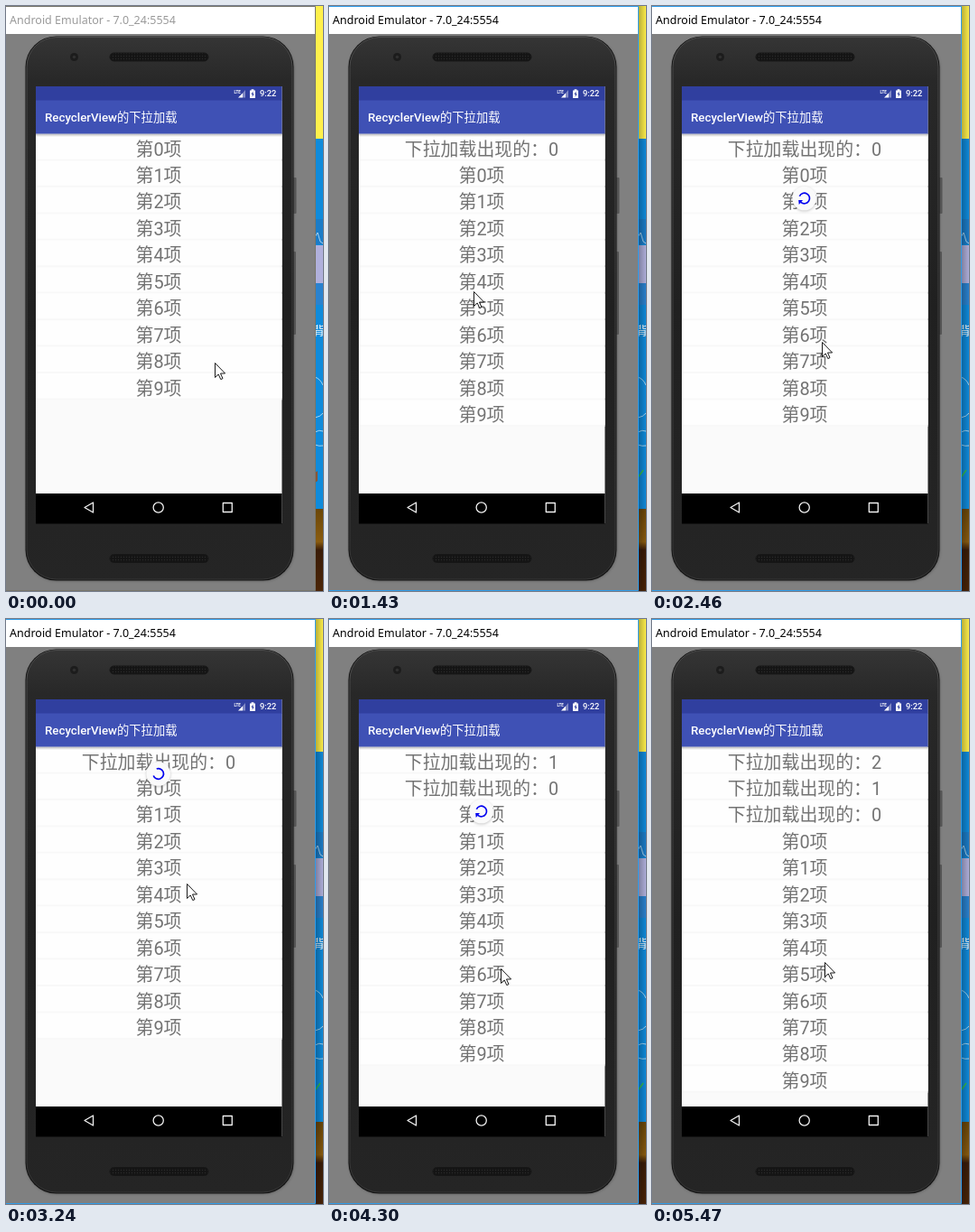
An HTML page for the animation above (6.08 s loop, 351 by 648 pixels).

```html
<!DOCTYPE html>
<html lang="zh-CN">
<head>
<meta charset="utf-8">
<title>Pull to load</title>
<style>
html, body { margin: 0; width: 100%; height: 100%; overflow: hidden; background: #808080; }
svg { display: block; width: 351px; height: 648px; }
text { font-family: Roboto, "Noto Sans CJK SC", sans-serif; }
#rows text { font-size: 19.9px; fill: #737373; text-anchor: middle; }
.caption { font: 12.5px "Noto Sans", "Open Sans", sans-serif; }
.active .idle, svg:not(.active) .focus { display: none; }
</style>
</head>
<body>
<svg id="stage" viewBox="0 0 351 648">
  <defs>
    <linearGradient id="body" x2="0" y2="1">
      <stop offset="0" stop-color="#353535"/><stop offset=".08" stop-color="#282828"/>
      <stop offset=".5" stop-color="#202020"/><stop offset="1" stop-color="#252525"/>
    </linearGradient>
    <linearGradient id="edge" x2="0" y2="1">
      <stop offset="0" stop-color="#4c4c4c"/><stop offset="1" stop-color="#363636"/>
    </linearGradient>
    <linearGradient id="drop" x2="0" y2="1">
      <stop offset="0" stop-opacity=".32"/><stop offset="1" stop-opacity="0"/>
    </linearGradient>
    <linearGradient id="dim">
      <stop offset="0" stop-opacity=".3"/><stop offset="1" stop-opacity=".03"/>
    </linearGradient>
    <linearGradient id="soil" x2="0" y2="1">
      <stop offset="0" stop-color="#6b4708"/><stop offset=".4" stop-color="#8a5c10"/>
      <stop offset=".5" stop-color="#3a1c08"/><stop offset="1" stop-color="#4b2508"/>
    </linearGradient>
    <pattern id="mesh" width="3" height="3" patternUnits="userSpaceOnUse">
      <rect width="3" height="3" fill="#141414"/><circle cx="1.5" cy="1.5" r=".7" fill="#2a2a2a"/>
    </pattern>
    <filter id="soft" x="-50%" y="-50%" width="200%" height="200%"><feGaussianBlur stdDeviation="1.6"/></filter>
    <clipPath id="view"><rect x="33" y="141.5" width="272.5" height="399"/></clipPath>
  </defs>

  <!-- desktop strip -->
  <rect x="342" width="9" height="148" fill="#fff04b"/>
  <rect x="342" y="147" width="9" height="411" fill="#0f8bdc"/>
  <rect x="342" y="236" width="9" height="28" fill="#1b7cc8"/>
  <rect x="342" y="265" width="9" height="42" fill="#b0b0dc"/>
  <rect x="342" y="307" width="9" height="24" fill="#2a82cf"/>
  <rect x="342" y="557" width="9" height="91" fill="url(#soil)"/>
  <path d="M342 256l3-5 3 10 3 2M342 411q6 2 9 9M342 456q6-1 9-5M342 472q5-3 9-1M342 486q5 2 9 1"
    fill="none" stroke="#b8def5" stroke-width=".9"/>
  <text x="340" y="364" font-size="13" fill="#fff">背</text>
  <path class="idle" d="M342 517l3-2v11l-3 2z" fill="#8a5636"/>
  <path class="focus" d="M341 518l2 3 5-7" fill="none" stroke="#35c24a" stroke-width="1.5"/>
  <rect class="focus" x="342" width="9" height="648" fill="url(#dim)"/>

  <!-- window -->
  <rect width="342" height="648" fill="#808080"/>
  <rect width="342" height="31" fill="#fff"/>
  <g class="idle">
    <path d="M0 .5H342.500V647.500H0" fill="none" stroke="#77756a"/>
    <text class="caption" x="4" y="20" fill="#9a9a9a">Android Emulator - 7.0_24:5554</text>
  </g>
  <g class="focus">
    <path d="M0 .5H342.500V647.500H0" fill="none" stroke="#2f9be8"/>
    <text class="caption" x="4" y="20">Android Emulator - 7.0_24:5554</text>
  </g>

  <!-- phone -->
  <rect x="22" y="35" width="297" height="602" rx="34" opacity=".25" filter="url(#soft)"/>
  <g fill="#555">
    <rect x="317" y="190" width="4.500" height="40" rx="1"/><rect x="317" y="272" width="4" height="92" rx="1"/>
  </g>
  <rect x="21.500" y="33.500" width="297" height="603" rx="34" fill="#141414"/>
  <rect x="23" y="34.500" width="294" height="600.500" rx="33" fill="url(#body)" stroke="url(#edge)"/>
  <g fill="url(#mesh)" stroke="#161616">
    <rect x="115" y="52" width="109" height="9" rx="4.500"/><rect x="115" y="607.500" width="109" height="9" rx="4.500"/>
  </g>
  <circle cx="75.500" cy="56.500" r="4.500" fill="#1c1c1c"/><circle cx="75.500" cy="56.500" r="1.800" fill="#303030"/>

  <!-- screen -->
  <rect x="33" y="89" width="272.500" height="484" fill="#fafafa"/>
  <g clip-path="url(#view)">
    <g id="rows"></g>
    <rect x="33" y="141" width="273" height="4" fill="url(#drop)"/>
    <g id="spinner">
      <circle cy="1" r="13.300" opacity=".22" filter="url(#soft)"/>
      <circle r="13.300" fill="#fafafa"/>
      <g id="ring">
        <path id="arc" fill="none" stroke="#0000f0" stroke-width="1.700"/>
        <path id="head" d="M-3.300 0H3.300L0 3.600Z" fill="#0000f0"/>
      </g>
    </g>
  </g>
  <rect x="33" y="89" width="272.500" height="16" fill="#303f9f"/>
  <rect x="33" y="104.500" width="272.500" height="37" fill="#3f51b5"/>
  <text x="43" y="128.300" font-size="13.300" font-weight="500" fill="#fff">RecyclerView<tspan font-weight="400">的下拉加载</tspan></text>
  <g fill="#fff">
    <text x="252.500" y="96.500" font-size="4.500" font-weight="700">LTE</text>
    <path d="M257 101.500h5v-5z"/><path d="M262 101.500v-5l3-3.500v8.500z" opacity=".4"/>
    <path d="M270 93.500h1.600v-1.200h2.800v1.200H276v8.500h-6z"/>
    <path d="M273.500 94.500l-2 3.300h1.200v3l2-3.500h-1.200z" fill="#303f9f"/>
    <text x="281" y="100.400" font-size="9.300" font-weight="500">9:22</text>
  </g>
  <rect x="33" y="540" width="272.500" height="33.500"/>
  <g fill="none" stroke="#f2f2f2" stroke-width="1.300" stroke-linejoin="round">
    <path d="M96.500 550v11l-9.500-5.500z"/><circle cx="168.700" cy="555.500" r="5.600"/>
    <rect x="240.300" y="550.500" width="10" height="10"/>
  </g>

  <path id="pointer" d="M.5.5V16.500L4.200 13 6.800 18.600 9 17.600 6.500 12H11.600Z" fill="#fff" stroke="#000" stroke-width=".9"/>
</svg>
<script>
const LOOP = 6080, TICK = 77.5, FOCUS = 730;
const PITCH = 29.44, TOP = 142;
const REST = 128, TRIGGER = 171.5, DEEPEST = 213;   // spinner centre
const SETTLE = 150, LOAD = 225, SHRINK = 150;       // ms after release

// Pointer moves; those with a release pull the list down.
const start = { x: 231, y: 395 };
const moves = [
  { from: 70, to: 580, x: 179, y: 207, bow: 38 },
  { from: 810, to: 1040, x: 163, y: 342, release: 1040 },
  { from: 1115, to: 1430, x: 160, y: 316 },
  { from: 1580, to: 1970, x: 196, y: 218 },
  { from: 2140, to: 2460, x: 188, y: 372, release: 3067 },
  { from: 2990, to: 3221, x: 200, y: 293 },
  { from: 3299, to: 3530, x: 203, y: 273 },
  { from: 3620, to: 3770, x: 202, y: 235 },
  { from: 3990, to: 4300, x: 190, y: 387, release: 5080 },
  { from: 5080, to: 5470, x: 191, y: 380 }
];
const pulls = moves.filter(m => m.release);

const $ = id => document.getElementById(id);
const clamp = v => Math.max(0, Math.min(1, v));
const mix = (a, b, f) => a + (b - a) * f;
const easeOut = p => 1 - (1 - p) ** 2;
const place = (id, transform) => $(id).setAttribute('transform', transform);

// The screen refreshes in ticks while something moves: time and share of the move.
function refresh(move, t) {
  const last = Math.round((move.to - move.from) / TICK);
  const gap = (move.to - move.from) / last;
  const k = Math.min(last, Math.floor((t - move.from) / gap + 1e-6));
  return { time: move.from + k * gap, share: (k + 1) / (last + 1) };
}

function pointerAt(a, b, share) {
  const f = share * (1.2 - .2 * share);
  const bow = (b.bow || 0) * Math.sin(Math.PI * share);
  return [mix(a.x, b.x, f) - bow, mix(a.y, b.y, f)].map(Math.round);
}

function spinnerAt(pull, t) {
  if (!pull) return { y: REST, scale: 0 };
  const since = t - pull.release;
  if (since <= 0) {
    const slop = .2, p = clamp((refresh(pull, t).share - slop) / (1 - slop));
    return { y: mix(REST, DEEPEST, easeOut(p)), scale: 1 };
  }
  return {
    y: mix(DEEPEST, TRIGGER, easeOut(clamp(since / SETTLE))),
    scale: 1 - clamp((since - LOAD) / SHRINK),
    spin: since
  };
}

function drawSpinner({ y, scale, spin }) {
  const pull = clamp((y - REST) / (TRIGGER - REST));
  const extra = Math.max(0, y - TRIGGER) / 42.5;
  const turn = spin ? 207 + spin * .28 : (-.25 + .4 * pull + extra) * 180;
  const sweep = spin ? 270 : Math.max(1, 288 * pull);
  const r = 5.8, a = sweep * Math.PI / 180;
  $('arc').setAttribute('d',
    `M${r} 0A${r} ${r} 0 ${sweep > 180 ? 1 : 0} 1 ${r * Math.cos(a)} ${r * Math.sin(a)}`);
  place('head', `rotate(${sweep}) translate(${r}) scale(${spin ? 0 : pull})`);
  place('ring', `rotate(${turn})`);
  $('ring').setAttribute('opacity', pull === 1 ? 1 : .3);
  place('spinner', `translate(168.7 ${y}) scale(${scale})`);
  $('spinner').style.display = y > REST && scale > 0 ? '' : 'none';
}

function draw(now) {
  const clock = now % LOOP;
  const i = moves.findLastIndex(m => clock >= m.from);
  const { time, share } = i < 0 ? { time: 0, share: 0 } : refresh(moves[i], clock);
  const [x, y] = pointerAt(moves[i - 1] || start, moves[i] || start, share);
  const loaded = pulls.filter(p => time >= p.release + LOAD).length;
  place('pointer', `translate(${x} ${y})`);
  place('rows', `translate(0 ${(loaded - pulls.length) * PITCH})`);
  drawSpinner(spinnerAt(pulls.findLast(p => time >= p.from), time));
  $('stage').classList.toggle('active', clock >= FOCUS);
}

const labels = pulls.map((_, n) => `下拉加载出现的：${n}`).reverse();
for (let n = 0; n < 10; n++) labels.push(`第${n}项`);
$('rows').innerHTML = labels.map((label, i) => {
  const top = TOP + i * PITCH;
  return `<rect x="33" y="${top}" width="273" height="${PITCH}" fill="#f8f8f8"/>
    <rect x="33" y="${top}" width="273" height="${PITCH - 2}" fill="#fefefe"/>
    <text x="169" y="${top + 23.6}">${label}</text>`;
}).join('');

(function loop() {
  draw(performance.now());
  requestAnimationFrame(loop);
})();
</script>
</body>
</html>
```
